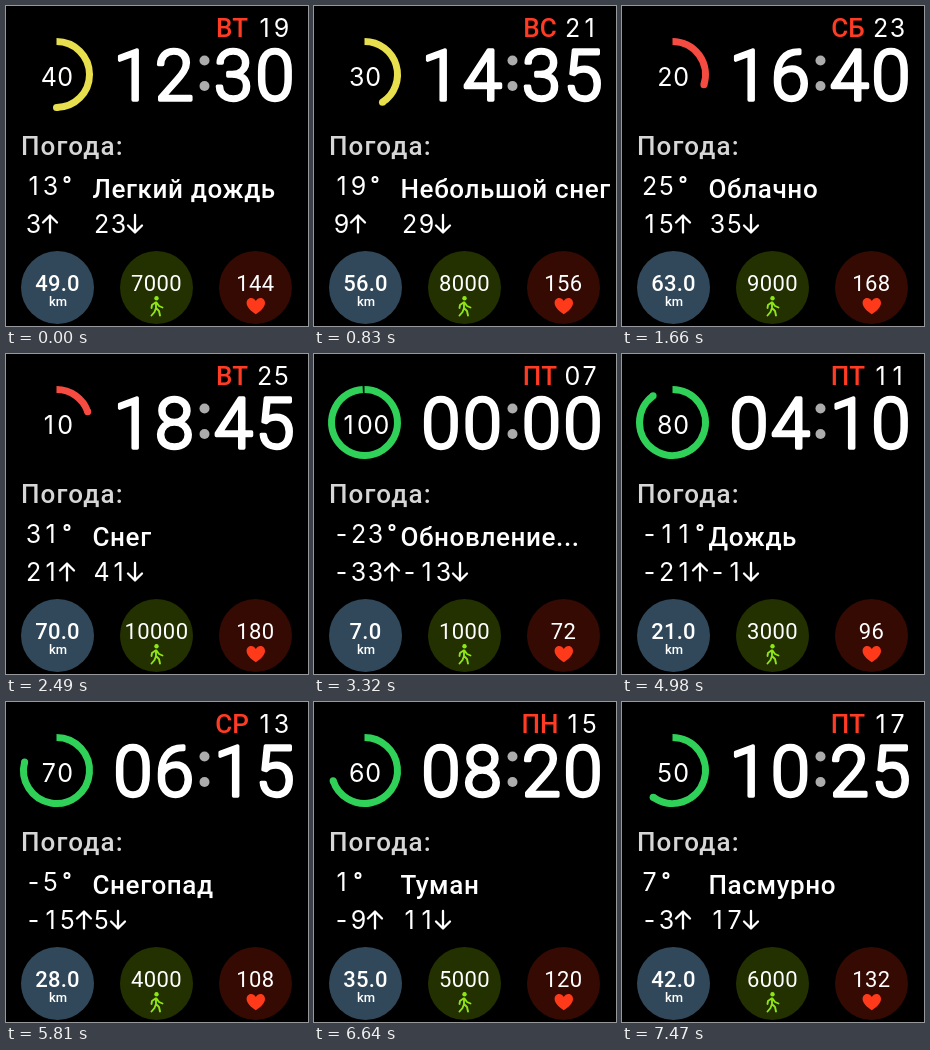
These frames come from a looping animation (302 px wide and 320 px high, 8.3 s). An HTML page:

```html
<!DOCTYPE html>
<html lang="ru">
<head>
<meta charset="utf-8">
<style>
  html, body { margin: 0; width: 100%; height: 100%; overflow: hidden; background: #000; }
  svg { display: block; width: 100%; height: 100%; }
  text { font-family: Roboto, sans-serif; font-size: 26px; font-weight: 500; fill: #fff; }
  .mid { text-anchor: middle; }
  .num { font-family: Inter, sans-serif; font-size: 25px; font-weight: 400; text-anchor: middle; }
  .clock { font-size: 70px; font-weight: 300; stroke: #fff; stroke-width: 3.4; stroke-linejoin: round; }
  .stat { font-size: 22px; letter-spacing: .2px; }
  .light { font-weight: 400; letter-spacing: .4px; }
  .line { fill: none; stroke: #fff; stroke-width: 2.3; stroke-linecap: round; stroke-linejoin: round; }
</style>
</head>
<body>
<svg viewBox="0 0 302 320">
  <rect width="302" height="320" fill="#000"/>
  <path id="arc" fill="none" stroke-width="7"/>
  <circle id="cap" r="3.5"/>
  <text id="charge" class="num" y="80"></text>

  <text id="week" class="mid" x="226" y="30.5" style="fill:#ff3b24"></text>
  <text id="date" class="num" y="30.5"></text>
  <text id="clock" class="mid clock" y="94"></text>
  <g fill="#acacac"><circle cx="198.500" cy="54.500" r="5"/><circle cx="198.500" cy="80" r="5"/></g>

  <text x="15" y="148.500" style="fill:#d6d6d6;letter-spacing:1.1px">Погода:</text>
  <text id="temp" class="num" y="189"></text>
  <circle id="degree" class="line" cy="173.500" r="2.500" style="stroke-width:2"/>
  <text id="sky" x="86.500" y="191.500" style="letter-spacing:.6px"></text>
  <text id="low" class="num" y="227"></text>
  <path id="up" class="line" d="M0 226.500V210M-7 216.500L0 209.500L7 216.500"/>
  <text id="high" class="num" y="227"></text>
  <path id="down" class="line" d="M0 209V226M-7 219.500L0 226.500L7 219.500"/>

  <circle cx="51.5" cy="281.5" r="36.5" fill="#30485a"/>
  <circle cx="150.5" cy="281.5" r="36.5" fill="#233000"/>
  <circle cx="249.5" cy="281.5" r="36.5" fill="#340a03"/>
  <text id="km" class="mid stat" x="51.5" y="285"></text>
  <text class="mid" x="52" y="300" style="font-size:13px">km</text>
  <text id="steps" class="mid stat light" x="150.5" y="285"></text>
  <text id="pulse" class="mid stat light" x="249.5" y="285"></text>
  <circle cx="150.500" cy="292.300" r="2.200" fill="#8ee616"/>
  <path d="M150 296.500V302L153 305L154 309.500M150 302L148.500 306L145.500 309.500M149.500 296.500L146 299L145.500 302M150.500 296.500L153 300L156.500 301.500" fill="none" stroke="#8ee616" stroke-width="1.900" stroke-linecap="round" stroke-linejoin="round"/>
  <path d="M249.800 308.300C245 305 240.600 301.200 240.600 297C240.600 291.500 247.300 290.300 249.800 295C252.300 290.300 259 291.500 259 297C259 301.200 254.600 305 249.800 308.300Z" fill="#ff3a1a"/>
</svg>
<script>
const STEP = 830, COUNT = 10, FIRST = 6;
const DAYS = 'ПТ ЧТ ПТ СР ПН ПТ ВТ ВС СБ ВТ'.split(' ');
const SKIES = ['Обновление...', 'Ясно', 'Дождь', 'Снегопад', 'Туман',
  'Пасмурно', 'Легкий дождь', 'Небольшой снег', 'Облачно', 'Снег'];
const SWEEPS = [357, 342, 324, 285, 252, 216, 180, 147, 108, 71];

const $ = id => document.getElementById(id);
const two = n => String(n).padStart(2, '0');

function set(id, attrs) {
  for (const name in attrs) $(id).setAttribute(name, attrs[name]);
}

function put(id, value) { $(id).textContent = value; }

// Puts each character in the middle of its own slot.
function slots(id, value, xs) {
  set(id, { x: xs.slice(0, value.length).join(' ') });
  put(id, value);
}

// Writes a number and moves the sign that follows it.
function row(id, value, x, mark) {
  const s = String(value);
  slots(id, s, [0, 1, 2].map(i => x + 17 * i));
  set(mark, { transform: `translate(${x + 17 * s.length - .5} 0)` });
}

function drawRing(i) {
  const charge = 100 - 10 * i, a = SWEEPS[i] * Math.PI / 180;
  const x = 50.5 + 33 * Math.sin(a), y = 68.5 - 33 * Math.cos(a);
  const color = charge >= 50 ? '#30d158' : charge >= 30 ? '#e8df4e' : '#f54b40';
  set('arc', { d: `M50.5 35.5A33 33 0 ${a > Math.PI ? 1 : 0} 1 ${x} ${y}`, stroke: color });
  set('cap', { cx: x, cy: y, fill: color, visibility: i ? 'visible' : 'hidden' });
  const s = String(charge), x0 = 51 - 8.25 * (s.length - 1);
  slots('charge', s, [x0, x0 + 16.5, x0 + 33]);
}

function draw(i) {
  drawRing(i);
  put('week', DAYS[i]);
  slots('date', two(7 + 2 * i), [258.5, 275.5]);
  slots('clock', two(2 * i) + two(5 * i), [127, 168.5, 227.5, 269]);
  const t = 6 * i - 23;
  row('temp', t, 27.5, 'degree');
  row('low', t - 10, 27.5, 'up');
  row('high', t + 10, 95.5, 'down');
  put('sky', SKIES[i]);
  put('km', (7 * (i + 1)).toFixed(1));
  put('steps', 1000 * (i + 1));
  put('pulse', 72 + 12 * i);
}

let shown = -1;
const start = performance.now();
function tick() {
  const i = (Math.floor((performance.now() - start) / STEP) + FIRST) % COUNT;
  if (i !== shown) draw(shown = i);
  requestAnimationFrame(tick);
}
tick();
</script>
</body>
</html>
```
